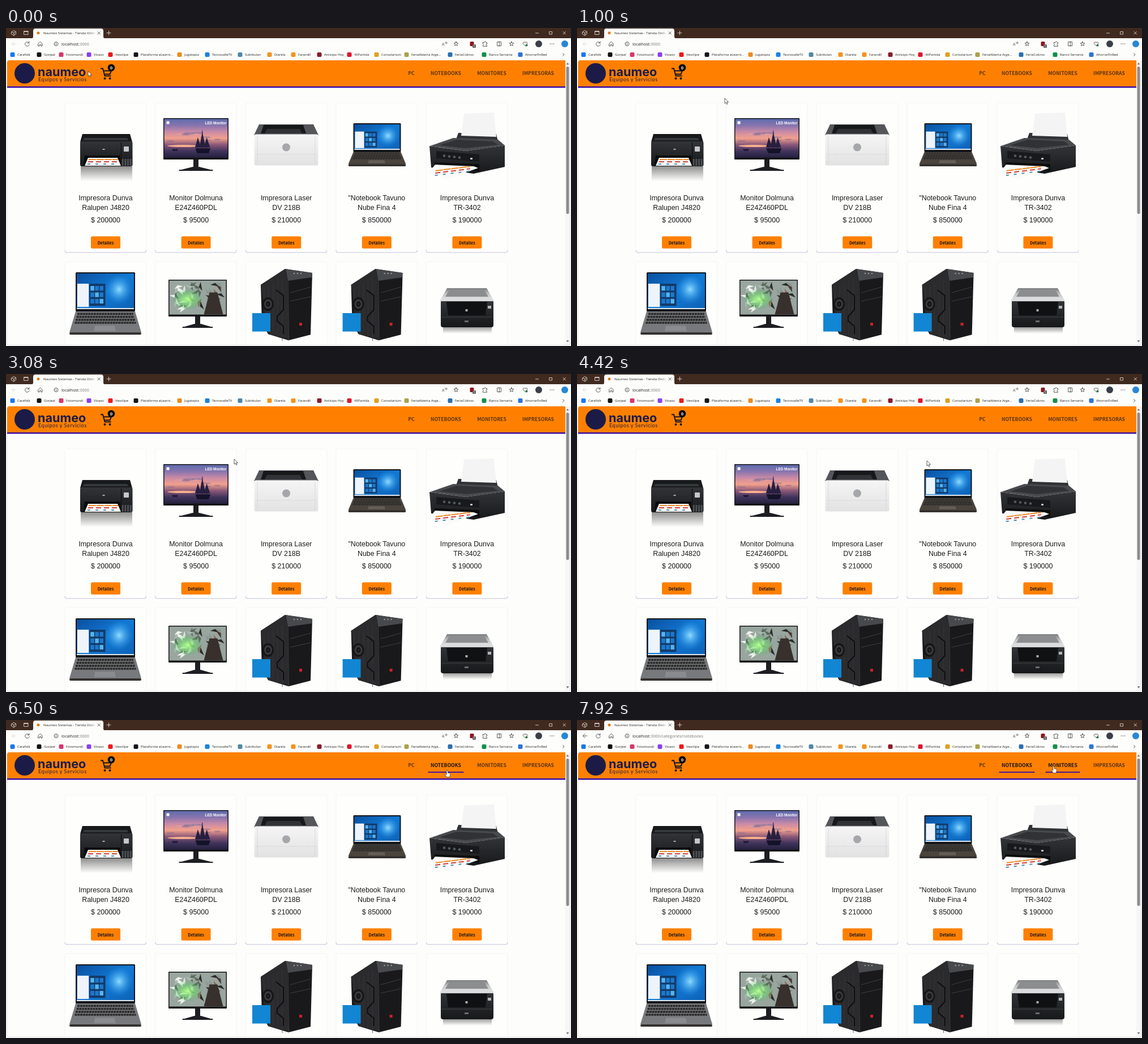
Recreate the animation shown at these times as an HTML page. Size 998 by 561 pixels, loop 8 s.

```html
<!DOCTYPE html>
<html lang="es">
<head>
<meta charset="utf-8">
<title>Naumeo Sistemas - Tienda Online</title>
<style>
html, body { margin: 0; width: 100%; height: 100%; overflow: hidden; background: #fdfdfb; }
svg { display: block; width: 998px; height: 561px; }
.ui { font-family: "Open Sans", "Noto Sans", sans-serif; }
.shop { font-family: "Liberation Sans", Arial, sans-serif; }
.nav { font-family: "Noto Sans CJK JP", "Noto Sans CJK", "Noto Sans", sans-serif; font-weight: 700; }
.brand { font-family: Inter, sans-serif; font-weight: 700; }
.tag { font-family: Lato, sans-serif; }
.icon { fill: none; stroke: #333; stroke-width: .8; stroke-linecap: round; stroke-linejoin: round; }
</style>
</head>
<body>
<svg id="stage" viewBox="0 0 998 561" xmlns="http://www.w3.org/2000/svg"></svg>
<script>
const ORANGE = '#ff8000', PURPLE = '#3a0ca3', NAVY = '#1c1b48', PAGE = '#fdfdfb', DARK = '#17131c';
const PITCH = 159.6, MID = 'text-anchor="middle"';

const rect = (x, y, w, h, fill, more = '') => `<rect x="${x}" y="${y}" width="${w}" height="${h}" fill="${fill}" ${more}/>`;
const oval = (x, y, rx, ry, fill) => `<ellipse cx="${x}" cy="${y}" rx="${rx}" ry="${ry}" fill="${fill}"/>`;
const circ = (x, y, r, fill) => oval(x, y, r, r, fill);
const poly = (pts, fill) => `<polygon points="${pts}" fill="${fill}"/>`;
const line = (d, color, w = 1, more = '') => `<path d="${d}" fill="none" stroke="${color}" stroke-width="${w}" ${more}/>`;
const icon = (d, more = '') => `<path class="icon" d="${d}" ${more}/>`;
const text = (x, y, s, size, cls, fill, more = '') => `<text x="${x}" y="${y}" font-size="${size}" class="${cls}" fill="${fill}" ${more}>${s}</text>`;
const times = (n, f) => Array.from({ length: n }, (_, i) => f(i)).join('');
// Symmetric trapezoid: y and width at the top, then at the bottom
const trap = (cx, y0, w0, y1, w1, fill) => poly([cx - w0 / 2, y0, cx + w0 / 2, y0, cx + w1 / 2, y1, cx - w1 / 2, y1], fill);

function random(seed) {
  return () => (seed = seed * 16807 % 2147483647) / 2147483647;
}

function grad(id, colors, dir = 'x2="0" y2="1"') {
  const stops = colors.map((c, i) => `<stop offset="${i / (colors.length - 1)}" stop-color="${c}"/>`);
  return `<linearGradient id="${id}" ${dir}>${stops.join('')}</linearGradient>`;
}
const glow = (id, inner, outer) => `<radialGradient id="${id}"><stop stop-color="${inner}"/><stop offset="1" stop-color="${outer}" stop-opacity="0"/></radialGradient>`;

const defs = '<defs>' +
  grad('sunset', ['#5f6cae', '#8774ae', '#c98aa6', '#f2a08c', '#8a5878', '#40345c', '#25213f']) +
  grad('desk', ['#0a4f9f', '#1279d4', '#0d62b6'], 'x2="1" y2="1"') +
  grad('shade', ['#00000070', '#00000000']) +
  grad('white', ['#f5f5f5', '#e2e2e3']) +
  grad('black', ['#333437', '#17181a']) +
  grad('silver', ['#77797b', '#c6c7c9', '#e4e4e5']) +
  grad('fade', ['#fdfdfb00', PAGE], 'x2="1" y2="0"') +
  glow('green', '#b8ff90', '#1fbf3a') + glow('beam', '#8fdcff', '#2a9af0') +
  '<clipPath id="page"><path d="M2 559V61q0-4 4-4H996V559z"/></clipPath></defs>';

// Browser frame
const marks = [
  [20, 'Carafolk', '#1877f2'], [67, 'Gorjeal', '#111'], [106, 'Fotomundi', '#d8366f'], [155, 'Vivaxo', '#8a3ff0'],
  [193, 'Veoclipe', '#f01818'], [238, 'Plataforma eLearni...', '#15161a'], [315, 'Jugatopia', '#f08a1c'],
  [364, 'TecnovalleTV', '#1b82e0'], [422, 'Subtitulan', '#4f88a5'], [474, 'Diarela', '#f5921e'], [516, 'Farandil', '#f5921e'],
  [562, 'Anticipo Hoy', '#8c1a2c'], [615, '4XPartida', '#e0142c'], [663, 'Consolarium', '#e0a020'],
  [716, 'FeriaAbierta Arge...', '#aaa34c'], [793, 'FeriaCobros', '#2b6fb0'], [853, 'Banco Serranía', '#12904a'], [917, 'AhorrarEnRed', '#2d74d8']
];

function star(cx) {
  const point = i => {
    const r = i % 2 ? 1.8 : 4, a = i * Math.PI / 5;
    return `${cx + r * Math.sin(a)} ${28 - r * Math.cos(a)}`;
  };
  return icon('M' + Array.from({ length: 10 }, (_, i) => point(i)).join('L') + 'z');
}

function browser() {
  const pale = 'style="stroke:#f0e9e5"';
  const title = rect(0, 0, 998, 18, '#402a20') +
    `<path d="M46 18q2 0 2-3V5q0-4 4-4h116q4 0 4 4v10q0 3 2 3z" fill="${PAGE}"/>` +
    icon('M10 7l3.5-2.500 4 2v4l-4 2.500-4-2.500zM10 7l4 2 3-2.500M14 9v4M32 5.500h7v6h-7zM32 6.500h7', pale) +
    circ(57, 8.700, 2.500, '#e07a20') + text(66, 11, 'Naumeo Sistemas - Tienda Onlin', 6.050, 'ui', '#222') +
    rect(148, 3, 11, 12, 'url(#fade)') + icon('M162 6.500l4.500 4.500m0-4.500l-4.500 4.500') +
    icon('M178 8.700h7m-3.500-3.500v7M935.500 9h5M960 6.500h4.500v4.500h-4.500zM984 6.500l4.500 4.500m0-4.500l-4.500 4.500', pale);
  const tools = icon('M18 28h-7.500m3.500-3.500l-3.500 3.500 3.500 3.500', 'id="back"') +
    icon('M40.500 26a3.800 3.800 0 1 0 .7 3M41 24v2.500h-2.500M57 27.500l3.500-3.300 3.500 3.300v4.300h-2.200v-2.500h-2.600v2.500h-2.200z') +
    icon('M85 28a3.500 3.500 0 0 1 7 0a3.500 3.500 0 0 1-7 0M88.500 27.500v2.300M88.500 26v.2') +
    '<text x="98" y="30.500" font-size="7.25" class="ui" fill="#222">localhost<tspan fill="#777">:3000<tspan id="path"></tspan></tspan></text>' +
    text(770, 31, 'A', 7, 'ui', '#555') + icon('M776 25q1.500 1 0 2.500M778 24q2 2 0 4') + star(795) + star(893) +
    rect(819.500, 24, 7, 8, '#8e1420', 'rx="1.500"') + rect(824, 29, 6, 6, '#666', 'rx="1"') + text(825.500, 34, '1', 5, 'ui', '#fff') +
    icon('M842.500 25.500h2.500a1.500 1.500 0 0 1 3 0h1.500v2.500a1.500 1.500 0 0 0 0 3v1.300h-7v-2.300a1.300 1.300 0 0 0 0-2.400z') +
    icon('M868 24.500h6.500v7h-6.500zM871.300 24v8M917 31.500l-3.500-3.700a2 2 0 0 1 3.500-2 2 2 0 0 1 3.500 2z') +
    circ(919.500, 30.500, 2, '#2d7a4a') + circ(941, 28, 6, '#3a3f48') + times(3, i => circ(961.500 + i * 3, 28, .7, '#333')) + circ(987, 28, 6, '#2787d6');
  const bar = marks.map(([x, name, color]) =>
    rect(x - 12.500, 43, 8, 8, color, 'rx="2"') + text(x, 49.200, name, 5.900, 'ui', '#222')).join('');
  return title + tools + bar + icon('M983.500 44.500l2.500 2.500-2.500 2.500');
}

// Shop header
const links = ['PC', 'NOTEBOOKS', 'MONITORES', 'IMPRESORAS'];

function header() {
  return rect(2, 57, 986, 46.500, ORANGE) + rect(2, 103, 986, 2.500, PURPLE) +
    circ(33, 80, 18, NAVY) + text(56, 84.500, 'naumeo', 21.600, 'brand', NAVY) +
    text(57, 94, 'Equipos y Servicios', 9, 'tag', NAVY, 'letter-spacing=".55"') +
    line('M167 71.500h4l3.500 13h11M172 75.500h14l-2.500 6h-10', DARK, 2) +
    circ(174.500, 89, 2, DARK) + circ(183.500, 89, 2, DARK) +
    circ(186, 70, 6.300, '#080808') + text(186, 73, '0', 8, 'shop', '#fff', MID + ' font-weight="700"') +
    links.map((name, i) => `<g id="link${i}">${text(0, 82.800, name, 8.650, 'nav', DARK)}${rect(0, 91.200, 0, 1.800, PURPLE)}</g>`).join('');
}

// Sets the links from the right edge and returns the hover range of each
function layoutLinks() {
  let right = 968;
  return links.map((_, i) => i).reverse().map(i => {
    const [label, bar] = document.getElementById('link' + i).children;
    const w = label.getComputedTextLength(), x = right - w;
    label.setAttribute('x', x);
    bar.setAttribute('x', x - 4.5);
    bar.setAttribute('width', w + 9);
    right = x - 28.3;
    return { label, bar, active: i === 1, from: x - 4.5, to: x + w + 4.5 };
  });
}

// Product pictures
const prints = (cx, y, w) => ['#ee8a24', '#cc4338', '#4b90b0'].map((c, i) =>
  line(`M${cx - w / 2 - i} ${y + i * 4}h${w}`, c, 2, `stroke-dasharray="${13 - i * 4} ${1 + i * 4}"`)).join('');

function tankPrinter() {
  return rect(132, 244, 91, 26, 'url(#shade)') + trap(177, 187, 84, 201, 92, '#18191b') + trap(176, 194, 76, 198, 80, '#34393b') +
    rect(131, 200, 92.500, 44, 'url(#black)', 'rx="3"') + rect(203, 202, 1, 42, '#080808') + trap(170, 225, 62, 243, 66, '#08090a') +
    trap(171, 229, 52, 243, 64, '#fafafa') + prints(172, 232, 52) + rect(170.500, 213, 4, 2, '#aaa') +
    rect(208, 209, 9, 9, '#c3c8ca', 'rx="1"') + times(4, i => rect(204.500 + i * 4.700, 231, 3.200, 12, '#4b4e52'));
}

function monitor(cx, y, w, h, picture) {
  const foot = y + h + 21;
  return rect(cx - w / 2, y, w, h, '#151518', 'rx="1"') + picture(cx - w / 2 + 1.500, y + 1.500, w - 3, h - 5) +
    rect(cx - 4.500, y + h, 9, 14, '#1d1e22') + trap(cx, foot - 8, 12, foot - 2, w * .52, '#1d1e22') + rect(cx - w * .26, foot - 3, w * .52, 2, '#1d1e22');
}

function sunset(x, y, w, h) {
  const rnd = random(7), mast = i => x + w * (.53 + i * .07);
  return rect(x, y, w, h, 'url(#sunset)') +
    times(12, () => oval(x + w * (.1 + rnd() * .8), y + h * (.25 + rnd() * .35), 5 + rnd() * 8, 1 + rnd(), rnd() < .5 ? '#f4aa9655' : '#5b609866')) +
    oval(x + w * .3, y + h * .7, w * .25, 2, '#f8b08d') + trap(x + w * .61, y + h * .76, 27, y + h * .89, 20, '#14132a') +
    times(3, i => line(`M${mast(i)} ${y + h * .8}V${y + h * (.5 - (i === 1) * .2)}`, '#1d1831') +
      poly([mast(i), y + h * (.48 - (i === 1) * .14), mast(i) + 6, y + h * .74, mast(i) - 5, y + h * .74], '#271f3f')) +
    trap(x + w * .17, y + h * .78, 11, y + h * .83, 7, '#1f1c38') +
    rect(x + 4, y + 4, 5, 5, '#fff') + text(x + w - 2, y + 9, 'LED Monitor', 6.400, 'shop', '#fff', 'font-weight="700" text-anchor="end"');
}

function battle(x, y, w, h) {
  const rnd = random(41), left = ['#dfe5df', '#a9bbb0', '#5b6b5c', '#f2f4f0'], right = ['#4b3a35', '#8a6a58', '#2a2b2a', '#8d9792'];
  return rect(x, y, w, h, '#99a69f') + times(46, () => {
    const u = rnd(), v = rnd(), a = rnd() * 6.28, tones = u < .55 ? left : right;
    const cx = x + 8 + u * (w - 16), cy = y + 8 + v * (h - 16), dx = 8 * Math.cos(a), dy = 8 * Math.sin(a);
    return poly([cx - dx, cy - dy, cx + dx, cy + dy, cx - dy * .6, cy + dx * .6], tones[rnd() * 4 | 0]);
  }) + oval(x + w * .32, y + h * .55, 27, 19, 'url(#green)') + trap(x + w * .78, y + h * .35, 14, y + h, 34, '#38302d');
}

function laserWhite() {
  return trap(495, 170, 96, 189, 114, '#54565a') + trap(490, 171, 70, 186, 80, '#17181a') + trap(490, 178, 58, 186, 66, '#303236') +
    rect(438.500, 187.500, 113, 55, 'url(#white)', 'rx="3"') + line('M444 190v50M546 190v50M441 223h108', '#d2d3d4', .7) + circ(495, 210.500, 7, '#a5a7aa');
}

function laptop(cx, y, w, h, depth, color) {
  const x = cx - w / 2 + 2, top = y + h + 2, sw = w - 4, sh = h - 4, wide = w * 1.210;
  return rect(x - 2, y, w, h + 2, '#141518', 'rx="1.500"') + rect(x, y + 2, sw, sh, 'url(#desk)') +
    oval(x + sw * .74, y + h * .45, sw * .24, sh * .42, 'url(#beam)') +
    rect(x + 1, y + h * .3, sw * .2, sh * .65, '#eef4fa') + rect(x + sw * .22, y + h * .3, sw * .28, sh * .62, '#123a68') +
    times(9, i => rect(x + sw * (.24 + i % 3 * .08), y + h * (.36 + (i / 3 | 0) * .17), sw * .065, sh * .13, i % 4 ? '#1d78cc' : '#54b4f0')) +
    rect(x, y + h - 4, sw, 2, '#dfe8f0') + trap(cx, top, w, top + depth, wide, color) +
    times(4, i => line(`M${cx - w * (.47 + i * .015)} ${top + depth * (.12 + i * .14)}h${w * (.94 + i * .03)}`, '#2b2a2a', depth * .1, 'stroke-dasharray="4 .8"')) +
    trap(cx - 1, top + depth * .68, w * .33, top + depth * .94, w * .37, '#ffffff22') + rect(cx - wide / 2, top + depth, wide, 4, '#34312f', 'rx="2"');
}

function trayPrinter() {
  return poly('794,199 799,185 866,187 869,200', '#303236') + poly('809,151 862,149 866,192 804,190', '#f4f4f5') +
    poly('749,208 790,194 869,197 881,207 812,217', '#484a4e') + poly('765,207 796,197 860,200 869,206 812,212', '#303235') +
    poly('748,208 812,217 881,207 881,245 826,257 751,246', 'url(#black)') + poly('760,217 836,223 836,236 760,230', '#17191c') +
    times(4, i => circ(774 + i * 9, 225.500 + i, 2.300, '#555b60')) + rect(820, 229, 4, 3, '#bfc2c4') +
    poly('757,237 836,240 836,252 757,249', '#0b0c0d') + poly('758,241 826,244 834,247 778,267 746,256', '#fafafa') +
    `<g transform="rotate(-7 790 252)">${prints(790, 248, 62)}</g>`;
}

function tower(dx) {
  return `<g transform="translate(${dx})">` +
    poly('450,453 493,425 541,432 538,541 499,551 463,540 452,520', '#19191b') + poly('450,453 493,425 497,443 499,549 463,540', '#2b2b2d') +
    poly('494,425 541,432 540,440 498,446', '#48494c') + line('M498 446L499.500 550M502 467L538 457M502 482L538 474', '#424347', .9) +
    times(5, i => line(`M${456 + i * 8} ${458 - i * 4}v${62 + i * 12}`, '#38383b', .8)) +
    times(4, i => oval(463, 487, 10 - i * 3, 12 - i * 3.500, i % 2 ? '#3a3a3d' : '#151517')) +
    line('M477 462l13 10v25l-11 12v8l11 9v14', '#0e0e10', 2) + times(3, i => circ(509 + i * 6, 433, 1.200, '#9a9ca0')) +
    rect(518, 520, 5, 5, '#c9232b') + rect(435, 503, 32, 32.500, '#1286d2') + '</g>';
}

function laserBlack() {
  return rect(772, 526, 86, 13, 'url(#shade)') + rect(768, 480, 93, 48, 'url(#black)', 'rx="4"') +
    trap(814, 459, 70, 480, 94, 'url(#silver)') + trap(814, 461, 60, 474, 76, '#8b8d8f') + rect(767, 479, 94, 3, '#d9dadb') +
    trap(814, 483, 72, 507, 66, '#101113') + line('M770 510h89', '#48494c', .8) +
    rect(811.500, 496, 4, 4, '#aaa') + rect(851, 490, 6, 5, '#b4b5b6') + rect(810, 516, 7, 3, '#6b6c6f');
}

const items = [
  ['Impresora Dunva', 'Ralupen J4820', 200000], ['Monitor Dolmuna', 'E24Z460PDL', 95000], ['Impresora Laser', 'DV 218B', 210000],
  ['"Notebook Tavuno', 'Nube Fina 4', 850000], ['Impresora Dunva', 'TR-3402', 190000]
];

function card(i, y) {
  const x = 104.200 + i * PITCH;
  return rect(x, y, 143.300, 264, '#fefefd', 'rx="3" stroke="#f3f1f4" stroke-width=".8"') +
    line(`M${x} ${y + 260}q0 4 3 4h137.300q3 0 3-4`, '#c8c8e0', 1.200);
}

function shop() {
  const cards = items.map(([kind, model, price], i) => {
    const cx = 176 + i * PITCH, label = (y, s) => text(cx, y, s, 12.450, 'shop', '#1c1c1c', MID);
    return card(i, 132) + card(i, 412) + label(303.500, kind) + label(320.700, model) + label(343, '$ ' + price) +
      rect(cx - 26, 367.500, 52, 21.500, ORANGE, 'rx="2.500"') + text(cx, 381.600, 'Detalles', 7.200, 'nav', DARK, MID);
  }).join('');
  return cards + tankPrinter() + monitor(335.500, 159, 115, 73, sunset) + laserWhite() + laptop(655.500, 168, 84, 49, 21, '#4a443c') + trayPrinter() +
    laptop(175.500, 431, 105, 67, 37, '#77797c') + monitor(338.500, 444, 103, 65, battle) + tower(0) + tower(PITCH) + laserBlack();
}

const scrollbar = rect(988, 57, 9, 502, '#f7f6f6') + rect(989.500, 68, 5, 260, '#8c8c8c', 'rx="2.500"') +
  trap(992, 61, 0, 64.500, 5, '#777') + trap(992, 551, 5, 554.500, 0, '#777');

const pointer = (id, d) => `<path id="${id}" d="${d}" fill="#fff" stroke="#222" stroke-width=".7"/>`;
const pointers = pointer('arrow', 'M0 0V9.200l2.100-1.900 1.500 3.300 1.500-.7-1.400-3.200h2.800z') +
  pointer('hand', 'M-1.200 6V1q0-1.200 1.200-1.200T1.200 1v3.200l3.300.8q1.200.3 1.100 1.600l-.7 3.400-.8 2H-.8L-3.400 8.300q-.8-1.300.3-1.700.7-.2 1.900 1z');

const el = id => document.getElementById(id);
el('stage').innerHTML = defs + browser() +
  `<g clip-path="url(#page)">${rect(2, 57, 995, 502, PAGE)}${shop()}${header()}${scrollbar}</g>` +
  line('M1.500 558V61q0-4.500 4.500-4.500M2 559.500H996.500V58', '#dedbe0', .8) + pointers;
const menu = layoutLinks();

// Pointer stops: time, x, y
const stops = [
  [0, 145, 76], [1000, 261, 124], [3083, 403, 150], [4417, 618, 153], [5833, 634, 155],
  [6700, 802, 78.5], [7200, 802, 78.5], [7900, 842, 81.5], [8000, 842, 81.5]
];
const LOOP = 8000, STEP = 1000 / 12, CLICK = 6900;

function pointerAt(t) {
  const i = stops.findIndex(s => s[0] > t);
  const [t0, x0, y0] = stops[i - 1], [t1, x1, y1] = stops[i];
  const k = (t - t0) / (t1 - t0), e = k * k * (3 - 2 * k);
  return [x0 + (x1 - x0) * e, y0 + (y1 - y0) * e];
}

function draw(now) {
  const t = Math.floor((now % LOOP + 4) / STEP) * STEP % LOOP;
  const [x, y] = pointerAt(t), opened = t >= CLICK;
  let over = false;
  for (const { label, bar, active, from, to } of menu) {
    const hit = x > from && x < to && y > 66 && y < 93, on = hit || opened && active;
    over = over || hit;
    label.setAttribute('opacity', on ? 1 : .7);
    bar.setAttribute('visibility', on ? 'visible' : 'hidden');
  }
  for (const id of ['arrow', 'hand']) {
    el(id).setAttribute('transform', `translate(${x} ${y})`);
    el(id).setAttribute('visibility', (id === 'hand') === over ? 'visible' : 'hidden');
  }
  el('path').textContent = opened ? '/categories/notebooks' : '';
  el('back').style.stroke = opened ? '#333' : '#d5d3d3';
}

const start = performance.now();
function tick() {
  draw(performance.now() - start);
  requestAnimationFrame(tick);
}
tick();
</script>
</body>
</html>
```
